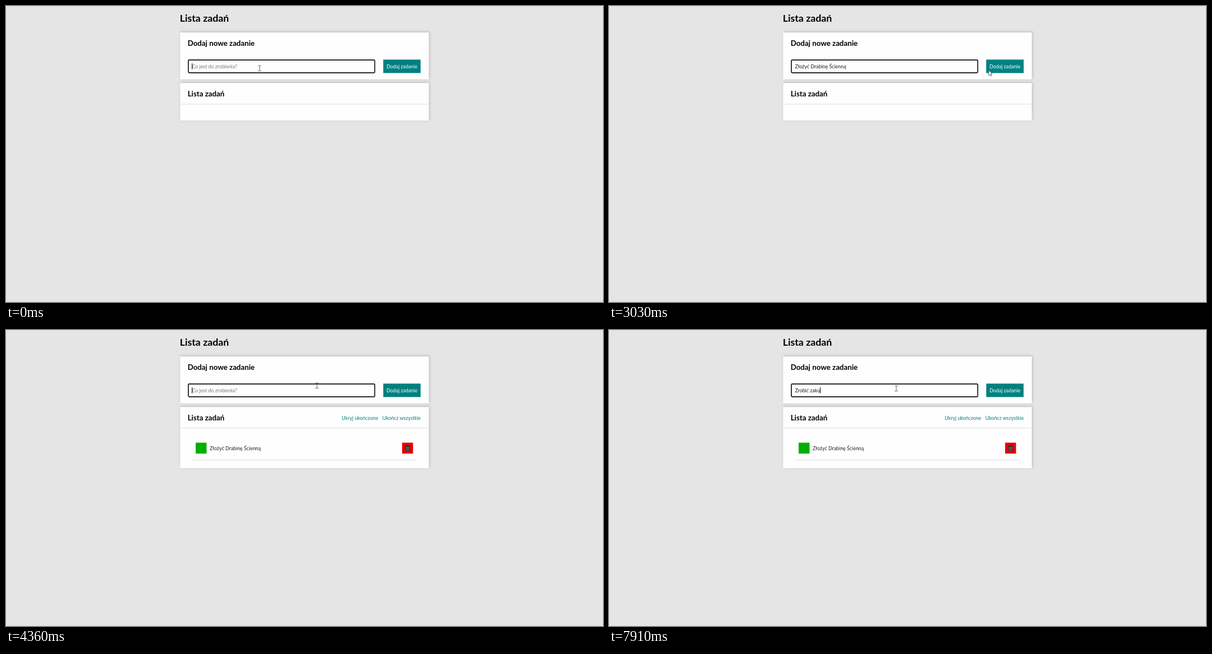
These frames come from a looping animation (1064x527 px, 8000 ms). An HTML page:

```html
<!DOCTYPE html>
<html lang="pl">
<head>
<meta charset="utf-8">
<title>Lista zadań</title>
<style>
  html, body { margin: 0; width: 100%; height: 100%; overflow: hidden; background: #e5e5e5; }
  svg { display: block; width: 100%; height: 100%; font: 16px Lato, sans-serif; }
  text { white-space: pre; }
  h1, .title { font-size: 32px; font-weight: 700; }
  .heading { font-size: 24px; font-weight: 700; }
  .panel { fill: #fefefe; filter: drop-shadow(2px -2px 4px #0003); }
  .rule { fill: #ddd; }
  .link { fill: teal; }
  .pointer { stroke-linejoin: round; }
</style>
</head>
<body>
<svg viewBox="0 0 1920 951" preserveAspectRatio="none">
  <text class="title" x="559" y="51">Lista zadań</text>

  <rect class="panel" x="560" y="85" width="800" height="150.5"/>
  <text class="heading" x="584" y="128.5">Dodaj nowe zadanie</text>
  <rect id="field" fill="#fff"/>
  <text id="value" x="598" y="200"></text>
  <rect id="caret" y="184" width="1.8" height="19.6"/>
  <g id="button">
    <rect x="-60" y="-21.6" width="120" height="43.2"/>
    <text y="6.2" text-anchor="middle" fill="#fff">Dodaj zadanie</text>
  </g>

  <rect id="listPanel" class="panel" x="560" y="247.5" width="800" height="120.5"/>
  <text class="heading" x="584" y="290.5">Lista zadań</text>
  <rect class="rule" x="560" y="314.5" width="800" height="1.6"/>

  <g id="task">
    <text class="link" x="1197" y="288.5" text-anchor="end">Ukryj ukończone</text>
    <text class="link" x="1334" y="288.5" text-anchor="end">Ukończ wszystkie</text>
    <rect x="610" y="362" width="35" height="35" fill="#00ae00"/>
    <text id="taskName" x="655" y="385.7" fill="#222"></text>
    <rect x="1274" y="362" width="35" height="35" fill="#e60000"/>
    <g transform="translate(1291.5 380)" stroke="#2b2b2b" stroke-width="1.6">
      <path d="M-6.5-5.5h13l-1.6 14h-9.8z" fill="#6d7478"/>
      <path d="M-3-4l.7 11M0-4v11M3-4l-.7 11" fill="none" stroke-width="1.2"/>
      <path d="M-8-6.5h16M-2.5-8.5h5" fill="none" stroke-width="2.2"/>
    </g>
    <rect class="rule" x="599.5" y="417" width="720" height="1.6"/>
  </g>

  <circle id="click" r="12.8" fill="#e6d700" fill-opacity=".6"/>
  <g id="cursor">
    <path id="beam" d="M-2.8-4.8h2.2l.6.6.6-.6h2.2M0-4.2v8.4M-2.8 4.8h2.2l.6-.6.6.6h2.2"
          fill="none" stroke="#4a4a4a" stroke-width=".9"/>
    <path id="arrow" class="pointer" d="M.3.4v9.2l2.1-1.9 1.4 3.1 1.4-.6-1.4-3.1h2.8z"
          fill="#fff" stroke="#333" stroke-width=".7"/>
  </g>
</svg>
<script>
const LOOP = 8000;
const SCALE = 1920 / 1064;
const TASK = 'Złożyć Drabinę Ścienną';
const NEXT = 'Zrobić zaku';
const KEY_TIMES = [5600, 5980, 6180, 6400, 6550, 6960, 7140, 7370, 7580, 7690, 7910];
const PASTE = 1240, PRESS = 3550, SUBMIT = 3750, ENTER = 3000, LEAVE = 3860;

// time, x, y in stage pixels
const PATH = [
  [1430, 452, 111], [1950, 594.5, 131], [2210, 644.5, 130.5], [2310, 644.5, 130.5],
  [3030, 676.5, 114], [3090, 678, 112.5], [3190, 678, 112.5], [3500, 682.5, 108.5],
  [SUBMIT, 682.5, 108.5], [3960, 585, 100.5], [4060, 585, 100.5],
  [4450, 545, 98.5], [4860, 513, 103], [4990, 512, 104]
];

const $ = id => document.getElementById(id);
const between = (t, a, b) => t >= a && t < b;
const clamp = v => Math.min(1, Math.max(0, v));
const show = (id, on) => $(id).setAttribute('visibility', on ? 'inherit' : 'hidden');
const set = (id, attrs) => {
  for (const name in attrs) $(id).setAttribute(name, attrs[name]);
};

// CSS "ease" curve: cubic-bezier(.25, .1, .25, 1)
function ease(x) {
  const curve = (s, a, b) => 3 * s * (1 - s) * ((1 - s) * a + s * b) + s ** 3;
  let low = 0, high = 1;
  for (let i = 0; i < 20; i++) {
    const mid = (low + high) / 2;
    if (curve(mid, .25, .25) < x) low = mid; else high = mid;
  }
  return curve(low, .1, 1);
}

function cursorAt(t) {
  const i = PATH.findIndex(p => p[0] > t);
  if (i < 0) return PATH[PATH.length - 1].slice(1);
  if (i === 0) return PATH[0].slice(1);
  const [t0, x0, y0] = PATH[i - 1], [t1, x1, y1] = PATH[i];
  const k = (t - t0) / (t1 - t0);
  return [x0 + (x1 - x0) * k, y0 + (y1 - y0) * k];
}

function drawField(t) {
  const focused = !between(t, PRESS, SUBMIT);
  const inset = focused ? 1.5 : .8;
  set('field', {
    x: 585 + inset, y: 172 + inset, width: 602.5 - 2 * inset, height: 44 - 2 * inset,
    rx: focused ? 3 : 2, stroke: focused ? '#101010' : '#767676', 'stroke-width': focused ? 3 : 1.4
  });

  const typed = between(t, PASTE, SUBMIT) ? TASK
    : NEXT.slice(0, KEY_TIMES.filter(k => k <= t).length);
  const value = $('value');
  const content = typed || 'Co jest do zrobienia?';
  if (value.textContent !== content) value.textContent = content;
  value.setAttribute('fill', typed ? '#1a1a1a' : '#757575');

  const caretOn = t < 510 || between(t, 1030, 2210) || between(t, SUBMIT, 4990) || t >= 5390;
  show('caret', caretOn);
  set('caret', { x: 597.7 + (typed ? value.getComputedTextLength() : 0) });
}

function drawButton(t) {
  const hover = ease(clamp((t - ENTER) / 500)) - ease(clamp((t - LEAVE) / 500));
  const shade = Math.round(128 + 38 * hover);
  set('button', {
    transform: `translate(1273.3 193.8) scale(${1 + .1 * hover})`,
    fill: `rgb(0,${shade},${shade})`
  });
}

function drawCursor(t) {
  const [x, y] = cursorAt(t);
  const overField = between(x, 325, 658) && between(y, 95, 120);
  show('cursor', !between(t, 390, 1430));
  show('beam', overField);
  show('arrow', !overField);
  set('cursor', { transform: `scale(${SCALE}) translate(${x} ${y})` });
  show('click', between(t, PRESS, SUBMIT));
  set('click', { cx: x * SCALE, cy: y * SCALE });
}

function draw(t) {
  drawField(t);
  drawButton(t);
  drawCursor(t);
  show('task', t >= SUBMIT);
  set('listPanel', { height: t >= SUBMIT ? 196.5 : 120.5 });
}

$('taskName').textContent = TASK;
const start = performance.now();
function tick() {
  draw((performance.now() - start) % LOOP);
  requestAnimationFrame(tick);
}
tick();
</script>
</body>
</html>
```
